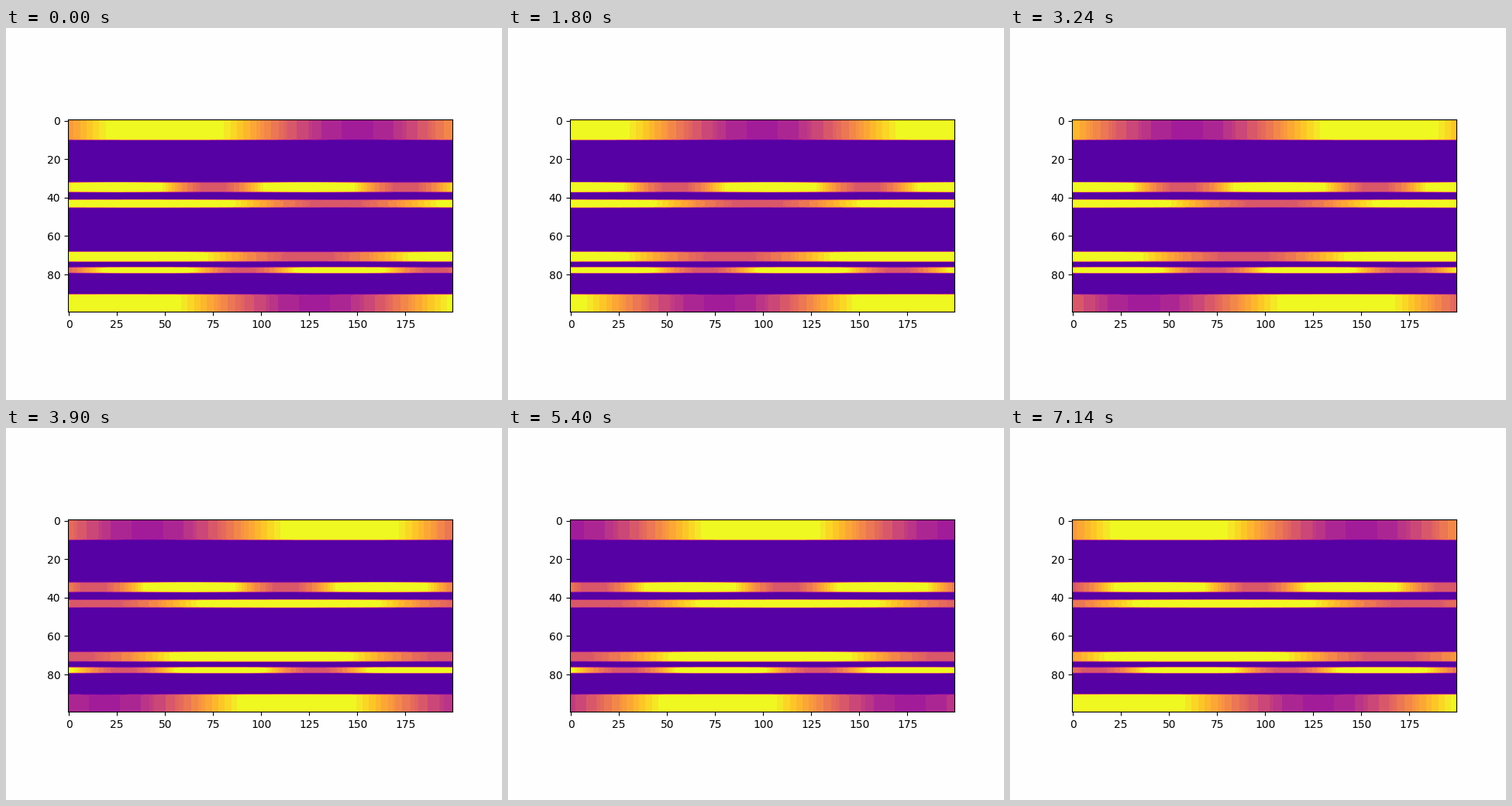
These frames come from a looping animation (640x480 px, 7.2 s). A matplotlib script:

```python
import numpy as np
import matplotlib.pyplot as plt
from matplotlib.animation import FuncAnimation
from matplotlib.colors import ListedColormap

FRAMES, INTERVAL = 120, 60
ROWS, COLS = 100, 200
BASE, SWING = 0.15, 0.4

x = 2 * np.pi * np.arange(COLS) / COLS


def slow(t, phase=0):
    """Wide outer bands: one turn per loop."""
    return 0.75 + SWING * np.sin(x + t + phase)


def fast(t, waves, phase=0):
    """Thin inner bands: brighter and quicker, so they jump at the loop."""
    return 0.95 + SWING * np.sin(waves * x + 4.8 * t + phase)


def field(frame):
    t = 2 * np.pi * frame / (FRAMES - 1)
    data = np.full((ROWS, COLS), BASE)
    data[:11] = slow(t)
    data[33:38] = fast(t, 2)
    data[42:46] = fast(t, 1, 0.35)
    data[69:74] = fast(t, 1, 0.8)
    data[77:80] = fast(t, 2, -1)
    data[91:] = slow(t, 0.7)
    return data


def stepped_cmap(data):
    """Plasma reduced to coarse RGB cells, each the mean of the colours used."""
    rgb = (plt.get_cmap("plasma")(np.arange(256))[:, :3] * 255).round().astype(int)
    r, g, b = (rgb >> [5, 4, 5]).T
    cell = np.unique(256 * r + 16 * g + b, return_inverse=True)[1].ravel()
    index = np.clip((data * 256).astype(int), 0, 255).ravel()
    weight = np.bincount(index, minlength=256) + 0.01
    total = np.bincount(cell, weight)
    mean = [np.bincount(cell, weight * c) / total for c in rgb.T]
    return ListedColormap(np.stack(mean, axis=1)[cell] / 255)


fig, ax = plt.subplots(figsize=(6.4, 4.8), dpi=100, facecolor="#fefefe")
image = ax.imshow(field(0), cmap=stepped_cmap(field(0)), vmin=0, vmax=1,
                  interpolation="hanning")


def update(frame):
    image.set_data(field(frame))
    return [image]


anim = FuncAnimation(fig, update, frames=FRAMES, interval=INTERVAL,
                     repeat=True, repeat_delay=0)
plt.show()
```
